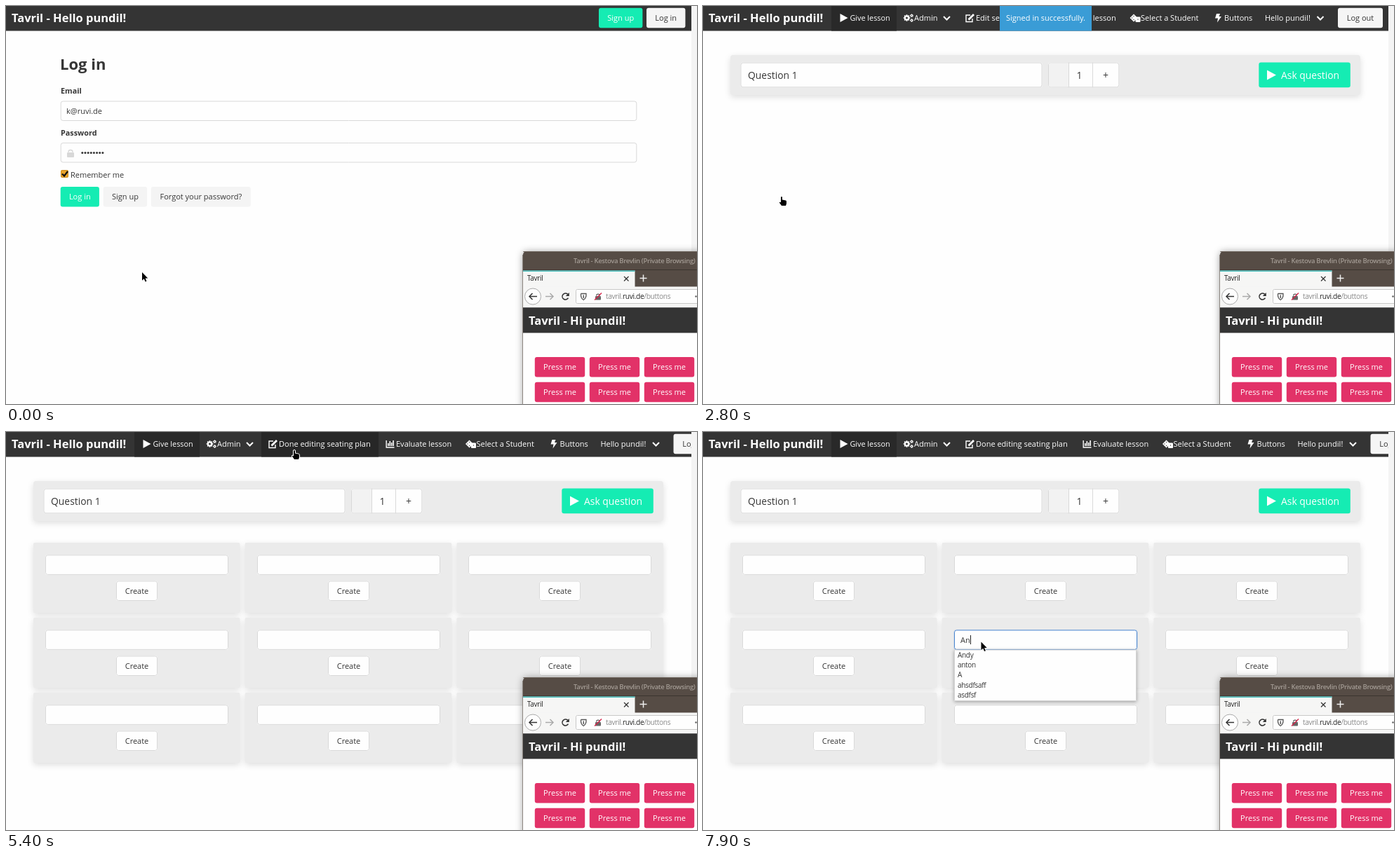
Animation of 985x568 px, one loop 8000 ms. Source, as an HTML page with a canvas:

```html
<!DOCTYPE html>
<html lang="en">
<head>
<meta charset="utf-8">
<title>Tavril</title>
<style>
html, body { margin: 0; width: 100%; height: 100%; overflow: hidden; background: #fefefe; }
canvas { display: block; }
</style>
</head>
<body>
<canvas id="stage" width="985" height="568"></canvas>
<script>
const ctx = document.getElementById('stage').getContext('2d');
const LOOP = 8000, STEP = 100;
const APP = 'Tavril', USER = 'pundil', HOST = 'ruvi.de';
const SITE = APP.toLowerCase() + '.';
const INK = '#363636', BAR = '#343434', TEAL = '#15ecb3', PINK = '#e23268', CARD = '#ebebeb', LINE = '#d9d9d9';
const NAV_H = 35.6, BTN_H = 28.5;

// time, x, y, cursor kind; each pose holds until the next
const POINTER = [
  [0, 194, 380, 'arrow'], [400, 189, 364, 'arrow'], [500, 181, 343, 'arrow'],
  [700, 166, 322, 'arrow'], [800, 141, 298, 'arrow'], [900, 119, 280, 'hand'],
  [1000, 107.5, 273, 'hand'], [1300, 112, 272, 'hand'], [2300, 111, 273.5, 'blocked'],
  [2800, 112, 272, 'hand'], [4000, 114, 267, 'arrow'],
  [4200, 137, 246, 'arrow'], [4300, 190, 200, 'arrow'], [4400, 262, 146, 'arrow'],
  [4500, 335, 96, 'beam'], [4600, 392, 46, 'arrow'], [4700, 411, 26, 'hand'],
  [5800, 414, 46, 'arrow'], [5900, 416, 88, 'beam'], [6000, 414, 140, 'arrow'],
  [6100, 410, 190, 'beam'], [6200, 405, 236, 'arrow'], [6300, 402, 276, 'arrow'],
  [6400, 400, 297, 'beam'], [6700, 398, 301, 'beam'], [6800, 397, 304, 'beam'],
  [7600, 396.5, 299.5, 'arrow']
];

function rect(x, y, w, h, fill, r = 0, line) {
  ctx.beginPath();
  ctx.roundRect(x, y, w, h, r);
  if (fill) { ctx.fillStyle = fill; ctx.fill(); }
  if (line) {
    ctx.beginPath();
    ctx.roundRect(x + .5, y + .5, w - 1, h - 1, r);
    ctx.strokeStyle = line; ctx.lineWidth = 1; ctx.stroke();
  }
}

function shadowed(color, blur, dy, draw) {
  ctx.save();
  ctx.shadowColor = color; ctx.shadowBlur = blur; ctx.shadowOffsetY = dy;
  draw();
  ctx.restore();
}

// y is the middle of the capitals; returns the right edge
function text(str, x, y, { size = 11, color = INK, weight = 460, align = 'left', gap = 0 } = {}) {
  ctx.font = `${weight} ${size}px "Open Sans", "Noto Sans", sans-serif`;
  ctx.letterSpacing = gap + 'px';
  ctx.textAlign = align;
  ctx.fillStyle = color;
  ctx.fillText(str, x, y + size * .36);
  return x + ctx.measureText(str).width;
}

function stroke(points, color, width = 1.5) {
  ctx.beginPath();
  points.forEach(([x, y], i) => i ? ctx.lineTo(x, y) : ctx.moveTo(x, y));
  ctx.strokeStyle = color; ctx.lineWidth = width; ctx.stroke();
}

function poly(points, fill) {
  ctx.beginPath();
  points.forEach(([x, y]) => ctx.lineTo(x, y));
  ctx.closePath();
  ctx.fillStyle = fill; ctx.fill();
}

function ring(x, y, r, fill, line, width = 1, from = 0, to = 7) {
  ctx.beginPath();
  ctx.arc(x, y, r, from, Math.min(to, from + Math.PI * 2));
  if (fill) { ctx.fillStyle = fill; ctx.fill(); }
  if (line) { ctx.strokeStyle = line; ctx.lineWidth = width; ctx.stroke(); }
}

function button(label, x, y, w, fill, color = INK, line) {
  rect(x, y, w, BTN_H, fill, 3, line);
  text(label, x + w / 2, y + BTN_H / 2, { color, align: 'center' });
}

const field = (x, y, w, h, line = LINE) => rect(x, y, w, h, '#fefefe', 3, line);
const play = (x, y, w, h) => poly([[x, y - h / 2], [x + w, y], [x, y + h / 2]], '#fff');
const chevron = x => stroke([[x, 15], [x + 4.5, 19.5], [x + 9, 15]], '#fff', 2);

function gear(x, y, r) {
  for (let i = 0; i < 8; i++) {
    const a = i * Math.PI / 4, c = Math.cos(a), s = Math.sin(a);
    stroke([[x + c * r * .6, y + s * r * .6], [x + c * r * 1.25, y + s * r * 1.25]], '#fff', r * .45);
  }
  ring(x, y, r * .7, null, '#fff', r * .6);
}

function editIcon(x) {
  stroke([[x + 7, 13], [x + 1, 13], [x + 1, 22.5], [x + 10, 22.5], [x + 10, 18]], '#fff', 1.4);
  stroke([[x + 4.5, 19.5], [x + 12, 12]], '#fff', 2.8);
}

function chartIcon(x) {
  stroke([[x + .7, 12], [x + .7, 22], [x + 12, 22]], '#fff', 1.4);
  [4, 7, 5, 8].forEach((h, i) => rect(x + 2.6 + i * 2.4, 20 - h, 1.6, h, '#fff'));
}

function diceIcon(x) {
  poly([[x, 17], [x + 5.5, 11.5], [x + 11, 17], [x + 5.5, 22.5]], '#fff');
  rect(x + 8, 15.5, 7, 7.5, '#fff', 1);
  [[3, 17], [5.5, 14.5], [5.5, 19.5], [11.5, 19]].forEach(([dx, y]) => ring(x + dx, y, .7, BAR));
}

function boltIcon(x) {
  poly([[x + 2, 11], [x + 7, 11], [x + 5.5, 15], [x + 9, 15], [x + 3, 23.5], [x + 4, 17.5], [x, 17.5]], '#fff');
}

function header() {
  rect(0, 0, 977, NAV_H, BAR);
  text(`${APP} - Hello ${USER}!`, 8, 17.5, { size: 16.5, weight: 700, color: '#fff' });
}

function login(t, p) {
  header();
  button('Sign up', 845, 2.8, 62.4, TEAL, '#fff');
  button('Log in', 913, 2.8, 55.4, '#f5f5f5');
  text('Log in', 77, 83.5, { size: 22, weight: 700 });
  text('Email', 78, 121, { size: 10.8, weight: 700 });
  field(77.7, 135.5, 821.6, BTN_H);
  text('k@' + HOST, 86, 150);
  text('Password', 78, 181, { size: 10.8, weight: 700 });
  field(77.7, 195, 821.6, BTN_H);
  rect(87, 209, 10, 7, '#d8d8d8', 1);
  ring(92, 208.5, 3, null, '#d8d8d8', 1.7, Math.PI, Math.PI * 2);
  for (let i = 0; i < 8; i++) ring(108.8 + i * 4.15, 209.5, 1.5, INK);
  rect(78, 234, 11, 11, '#eba52c', 2, '#c98a1f');
  stroke([[80, 239.5], [83, 242.5], [88, 236]], '#111', 2.2);
  text('Remember me', 92, 241);

  const over = p[2] < 286 && p[1] < 133;
  const busy = t >= 2400 ? .5 : t >= 2300 ? .75 : 1;
  ctx.globalAlpha = busy;
  button('Log in', 77.7, 258, 55.2, t >= 2100 && busy === 1 ? '#10d6a1' : over ? '#13e4ad' : TEAL, '#fff');
  ctx.globalAlpha = 1;
  if (t >= 2100) {
    ctx.setLineDash([1, 1]);
    rect(88, 264, 33, 16, null, 0, 'rgba(255,255,255,.7)');
    ctx.setLineDash([]);
  }
  button('Sign up', 138.7, 258, 62.4, '#f4f4f4');
  button('Forgot your password?', 206.8, 258, 142, '#f4f4f4');
}

function menu(t, p, editing) {
  const white = { color: '#fff' }, dx = editing ? 0 : -46.5;
  header();
  rect(183, 0, 93, NAV_H, '#292929');
  play(195.5, 17, 11, 12);
  text('Give lesson', 209.5, 17.5, { color: '#fff', size: 10.8 });
  gear(290.5, 17, 3.8);
  gear(297.5, 13.7, 1.9);
  gear(297.5, 20.5, 1.9);
  text('Admin', 301, 17.5, white);
  chevron(343);
  if (p[2] < NAV_H) rect(364, 0, editing ? 167 : 121, NAV_H, '#272727');
  if (!editing && t >= 5100) rect(363, 0, 1, NAV_H, '#a0a0a0');
  editIcon(374);
  text(editing ? 'Done editing seating plan' : 'Edit seating plan', 389, 17.5, white);
  chartIcon(541.5 + dx);
  text('Evaluate lesson', 556 + dx, 17.5, white);
  diceIcon(655 + dx);
  text('Select a Student', 670.5 + dx, 17.5, white);
  boltIcon(776.5 + dx);
  text('Buttons', 789.5 + dx, 17.5, white);
  text(`Hello ${USER}!`, 847.5 + dx, 17.5, white);
  chevron(922 + dx);
  ctx.save();
  ctx.beginPath();
  ctx.rect(0, 0, 977, 36);
  ctx.clip();
  button('Log out', 951.5 + dx, 2.8, 64, '#f5f5f5');
  ctx.restore();
  if (!editing) {
    rect(423, 0, 131, NAV_H, '#3a9cd6');
    text('Signed in successfully.', 488.5, 17.5, { color: '#fff', align: 'center' });
  }
}

function panel(x, y, w, h, r) {
  shadowed('rgba(0,0,0,.13)', 10, 3, () => rect(x, y, w, h, CARD, r));
}

function inside(p, x, y, w, h) {
  return p[1] >= x && p[1] <= x + w && p[2] >= y && p[2] <= y + h;
}

function question(p) {
  const top = 80.6, h = 35.7;
  panel(39, 70, 898, 57, 4);
  field(53.5, top, 430, h, inside(p, 54, top, 429, h) ? '#b5b5b5' : LINE);
  text('Question 1', 64, 99, { size: 13.9 });
  field(492, top, 101.3, h);
  rect(493, top + 1, 28, h - 2, '#f2f2f2', 2);
  rect(521, top, 1, h, LINE);
  rect(555, top, 1, h, LINE);
  text('1', 536.5, 99, { size: 14, align: 'center' });
  text('+', 574, 99, { size: 14, align: 'center' });
  rect(792.3, top, 130.5, h, TEAL, 3);
  play(804, 98.5, 13, 14);
  text('Ask question', 824, 99, { size: 13.9, color: '#fff' });
}

function seats(t, p) {
  for (let row = 0; row < 3; row++) for (let col = 0; col < 3; col++) {
    const x = 39 + col * 301.7, y = 158 + row * 107;
    panel(x, y, 294.5, 100, 2);
    const fx = Math.round(x + 17), fy = y + 17.4;
    const focus = row === 1 && col === 1 && t >= 6500;
    if (focus) rect(fx - .5, fy - .5, 262, BTN_H + 1, 'rgba(60,120,200,.25)', 4);
    field(fx, fy, 261, BTN_H, focus ? '#4a86cf' : inside(p, fx, fy, 261, BTN_H) ? '#a8a8a8' : LINE);
    button('Create', Math.round(x + 118), y + 54.5, 59, '#fefefe', INK, LINE);
  }
  if (t >= 6500) {
    const typed = t >= 7900 ? 'An' : t >= 7600 ? 'A' : '';
    const end = text(typed, 367, 297);
    rect(Math.round(end), 290, 1, 13, '#222');
  }
  if (t >= 7700) {
    shadowed('rgba(0,0,0,.35)', 5, 1, () => rect(358, 311, 260, 73, '#fefefe'));
    rect(358, 310.5, 260, 73.5, null, 0, '#d4d4d4');
    ['Andy', 'anton', 'A', 'ahsdfsaff', 'asdfsf'].forEach((s, i) =>
      text(s, 363, 318.4 + i * 14.2, { size: 10, gap: -.3 }));
  }
}

function popup() {
  shadowed('rgba(0,0,0,.4)', 11, 1, () => rect(737, 350, 260, 230, '#564c45', [5, 0, 0, 0]));
  rect(737, 350, 260, 1, '#6e645c', [5, 0, 0, 0]);
  text(`${APP} - Kestova Brevlin (Private Browsing)`, 809, 363.5, { size: 9.5, weight: 600, gap: -.35, color: '#a39b94' });
  rect(737, 376, 248, 1, '#3b342f');
  rect(737, 377, 248, 23.5, '#564c45');
  rect(737, 377.5, 159.5, 24, '#f6f6f5');
  rect(737, 377.5, 159.5, 1.5, '#3fb9b6');
  text(APP, 743, 388.5, { size: 9.9, gap: -.3, color: '#222' });
  stroke([[881, 386], [887.5, 392.5]], '#333', 1.3);
  stroke([[887.5, 386], [881, 392.5]], '#333', 1.3);
  stroke([[903.5, 388.5], [913.5, 388.5]], '#eee', 1.5);
  stroke([[908.5, 383.5], [908.5, 393.5]], '#eee', 1.5);

  rect(737, 400.5, 248, 30, '#f6f6f5');
  ring(751, 414.5, 11.5, '#fdfdfd', '#aaa');
  stroke([[757, 414.5], [746, 414.5]], '#333');
  stroke([[750.5, 410], [746, 414.5], [750.5, 419]], '#333');
  stroke([[769, 414.5], [780, 414.5]], '#aaa');
  stroke([[775.5, 410], [780, 414.5], [775.5, 419]], '#aaa');
  ring(797.5, 414.5, 4.5, null, '#333', 1.6, .5, 5.5);
  poly([[802.8, 409], [802.8, 414], [797.8, 414]], '#333');
  rect(812, 404, 190, 21, '#fefefe', 2, '#c8c8c8');
  ctx.beginPath();
  ctx.moveTo(819.5, 410.5);
  ctx.lineTo(827, 410.5);
  ctx.quadraticCurveTo(827.5, 417, 823.2, 419.5);
  ctx.quadraticCurveTo(819, 417, 819.5, 410.5);
  ctx.strokeStyle = '#555'; ctx.lineWidth = 1.3; ctx.stroke();
  stroke([[823.3, 412.5], [823.3, 417]], '#555', 1.5);
  rect(840, 414, 8, 5.5, '#666', 1);
  ring(844, 413.5, 2.4, null, '#666', 1.3, Math.PI, Math.PI * 2);
  stroke([[839, 419.5], [849, 409.5]], '#d7264c', 1.5);
  const url = { size: 10.2, gap: -.35, color: '#8a8a8a' };
  let x = text(SITE, 855, 414, url);
  x = text(HOST, x, 414, { ...url, color: '#222' });
  text('/buttons', x, 414, url);
  ring(983.5, 414.5, 1.3, '#666');

  rect(737, 430, 248, 138, '#fefefe');
  rect(737, 430.3, 248, NAV_H + .5, BAR);
  text(`${APP} - Hi ${USER}!`, 745, 448.7, { size: 16.5, weight: 700, color: '#fff' });
  for (let i = 0; i < 6; i++) {
    button('Press me', 753.8 + i % 3 * 78, i < 3 ? 501 : 536.7, 71.4, PINK, '#fff');
  }
  rect(736, 355, 1, 213, '#8d8782');
}

function status(str, w, color = '#333') {
  rect(-2, 554, w + 2, 16, '#f6f6f6', 2, '#d2d2d2');
  text(str, 2, 561.3, { size: 9.9, gap: -.32, color });
}

function statusLine(t) {
  const link = SITE + HOST + '/?edit_seating_plan=';
  if (t === 2700) status(`Transferring data from ${SITE}${HOST}...`, 208);
  if (t >= 4900 && t < 5400) status(link + 'true', 168, t >= 5300 ? '#858585' : '#333');
  if (t >= 5600 && t < 5900) status(link + 'false', 170, t >= 5800 ? '#858585' : '#333');
}

const CURSORS = {
  arrow() {
    const shape = new Path2D('M0 0V11.8L2.7 9.3L4.6 13.5L6.4 12.7L4.6 8.5H8.2Z');
    ctx.strokeStyle = '#fff'; ctx.lineWidth = 1.6; ctx.stroke(shape);
    ctx.fillStyle = '#000'; ctx.fill(shape);
  },
  hand() {
    const shape = new Path2D('M-1 .8Q0 -.6 1 .8V4.6L6 5.6Q7 6 7 7.2V10L6 13H0L-3.2 8.6Q-3 7 -1 8.4Z');
    ctx.strokeStyle = '#fff'; ctx.lineWidth = 2; ctx.stroke(shape);
    ctx.fillStyle = '#000'; ctx.fill(shape);
  },
  beam() {
    const bars = [[[-2.5, -5.5], [2.5, -5.5]], [[0, -5.5], [0, 5.5]], [[-2.5, 5.5], [2.5, 5.5]]];
    bars.forEach(b => stroke(b, '#fff', 3));
    bars.forEach(b => stroke(b, '#111', 1.4));
  },
  blocked() {
    shadowed('rgba(0,0,0,.5)', 4, 2, () => ring(0, 0, 13, '#fff'));
    ring(0, 0, 11.8, '#000');
    // two outlined openings on either side of a dark slash
    ctx.rotate(-Math.PI / 4);
    for (const side of [0, Math.PI]) {
      ctx.beginPath();
      ctx.arc(0, 0, 7, side + .35, side + Math.PI - .35);
      ctx.closePath();
      ctx.fillStyle = '#a9dccd'; ctx.fill();
      ctx.strokeStyle = '#fff'; ctx.lineWidth = 1.6; ctx.stroke();
    }
  }
};

function draw(t) {
  const p = POINTER.findLast(k => k[0] <= t);
  rect(0, 0, 985, 568, '#fefefe');
  rect(977, 0, 8, 568, '#f4f4f4');
  if (t < 2800) {
    login(t, p);
  } else {
    const editing = t >= 5400;
    menu(t, p, editing);
    question(p);
    if (editing) seats(t, p);
  }
  popup();
  statusLine(t);
  ctx.save();
  ctx.translate(p[1], p[2]);
  CURSORS[p[3]]();
  ctx.restore();
}

const start = performance.now();
function tick() {
  const t = (performance.now() - start) % LOOP;
  draw(Math.floor(t / STEP) * STEP);
  requestAnimationFrame(tick);
}
tick();
</script>
</body>
</html>
```
